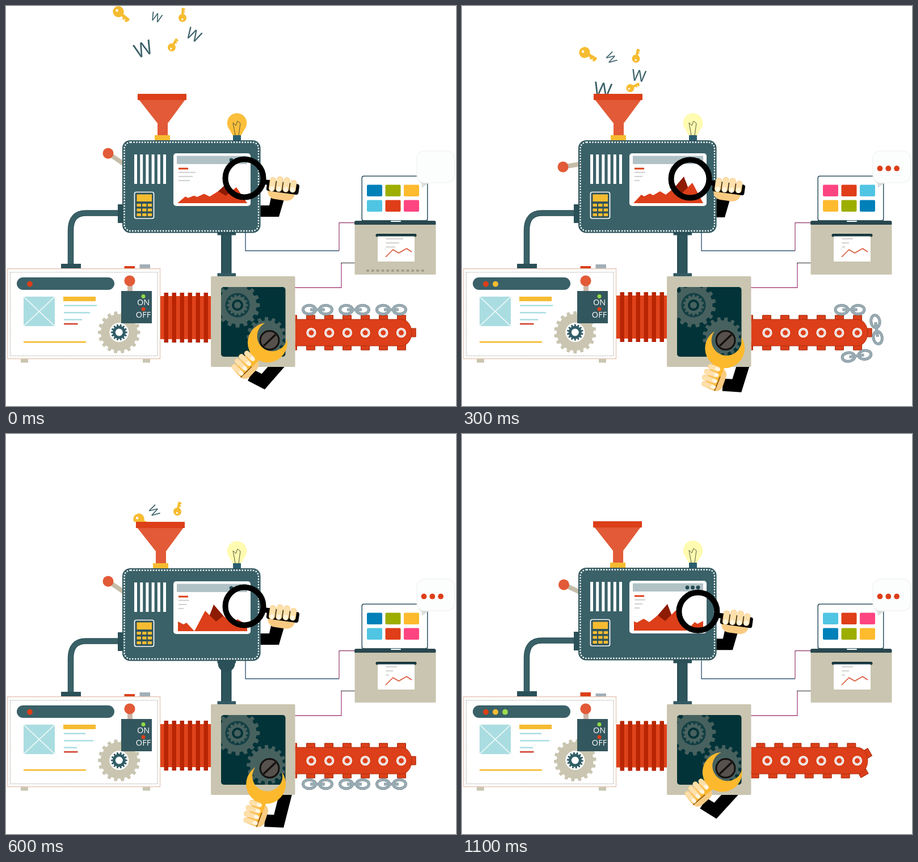
An HTML page with a canvas that plays this animation: 793x706 px, repeating every 1.2 s.

```html
<!DOCTYPE html>
<html lang="en">
<head>
<meta charset="utf-8">
<title>Content machine</title>
<style>
html, body { margin: 0; width: 100%; height: 100%; overflow: hidden; background: #fff; }
canvas { display: block; width: 793px; height: 706px; }
</style>
</head>
<body>
<canvas id="stage" width="793" height="706"></canvas>
<script>
const c = document.getElementById('stage').getContext('2d');
const TEAL = '#3a6168', DEEP = '#2b5058', NIGHT = '#023338', BEIGE = '#c9c5b0',
  RED = '#dc3f19', CORAL = '#e25a37', GOLD = '#f6bc31', SKY = '#aadde1',
  AMBER = '#fdb92d', SKIN = '#f9cb82', FINGER = '#fde0ab', NAIL = '#fff6e0', PI = Math.PI;

// Angles are in degrees; time s runs from 0 to 12 in steps of 100 ms.
const sin = deg => Math.sin(deg * PI / 180);
const cos = deg => Math.cos(deg * PI / 180);
const clamp = (v, lo, hi) => Math.min(hi, Math.max(lo, v));

function rect(x1, y1, x2, y2, fill, r = 0) {
  c.beginPath();
  c.roundRect(x1, y1, x2 - x1, y2 - y1, r);
  c.fillStyle = fill;
  c.fill();
}
function frame(x1, y1, x2, y2, color, w, r = 0) {
  c.beginPath();
  c.roundRect(x1, y1, x2 - x1, y2 - y1, r);
  stroke(color, w);
}
function stroke(color, w) {
  c.strokeStyle = color;
  c.lineWidth = w;
  c.stroke();
}
function disc(x, y, r, fill) {
  c.beginPath();
  c.arc(x, y, r, 0, 2 * PI);
  c.fillStyle = fill;
  c.fill();
}
function ring(x, y, r, color, w) {
  c.beginPath();
  c.arc(x, y, r, 0, 2 * PI);
  stroke(color, w);
}
function trace(pts) {
  c.beginPath();
  pts.forEach(([x, y]) => c.lineTo(x, y));
}
function poly(pts, fill) {
  trace(pts);
  c.closePath();
  c.fillStyle = fill;
  c.fill();
}
function line(pts, color, w) {
  trace(pts);
  stroke(color, w);
}
function group(x, y, deg, draw) {
  c.save();
  c.translate(x, y);
  c.rotate(deg * PI / 180);
  draw();
  c.restore();
}
function clipped(x1, y1, x2, y2, draw) {
  c.save();
  c.beginPath();
  c.rect(x1, y1, x2 - x1, y2 - y1);
  c.clip();
  draw();
  c.restore();
}
function gear(x, y, r, n, depth, fill, turn = 0) {
  const pts = [];
  for (let i = 0; i < n; i++) {
    [-.3, -.2, .2, .3].forEach((o, k) => {
      const a = (i + o + turn) / n * 360, d = k % 3 ? r : r - depth;
      pts.push([x + d * cos(a), y + d * sin(a)]);
    });
  }
  poly(pts, fill);
}
function text(str, x, y, size, fill) {
  c.font = size + 'px "Open Sans", "Noto Sans", sans-serif';
  c.textAlign = 'center';
  c.textBaseline = 'alphabetic';
  c.fillStyle = fill;
  c.fillText(str, x, y);
}

function doorKey(k) {
  c.scale(k, k);
  rect(5, -2.5, 22, 2.5, GOLD, 1);
  rect(12, 0, 15, 5, GOLD);
  rect(17, 0, 21, 5, GOLD);
  disc(0, 0, 8.8, GOLD);
  disc(-3, 0, 2, '#fff');
}
function letter(size) {
  text('W', 0, size * .357, size, TEAL);
}

// Pieces drop quickly, then sink slowly into the funnel.
function falling(s) {
  const drop = (draw, size, x, y, deg, drift, spin, late = 10) =>
    group(x + drift * s, y + 24 * Math.min(s, 4) + late * Math.max(0, s - 4),
      deg + spin * Math.min(s, 2), () => draw(size));
  clipped(150, 0, 400, 155, () => {
    drop(doorKey, 1.1, 198, 10, 40, 6, -5, 22);
    drop(doorKey, .8, 311, 21, -88, -1.5, 5);
    drop(doorKey, .8, 292, 73, -60, 1.5, 16, 24);
    drop(letter, 21, 265, 20, 20, -.7, 20);
    drop(letter, 28, 331, 51, 28, -6.5, -10, 24);
    drop(letter, 35, 242, 76, -20, 2, 14, 24);
  });
}

function wires() {
  line([[422, 400], [422, 432], [587, 432]], '#34587a', 1.4);
  line([[587, 432], [587, 382.5], [615, 382.5]], '#9a4a78', 1.3);
  line([[509, 497], [591, 497], [591, 453.5]], '#a8447c', 1.3);
  line([[590, 453.5], [615, 453.5]], '#555', 1.3);
}

// One mountain range, repeated side by side; it faces left or right.
function chart(s) {
  const flip = s < 4 || s > 7;
  const peak = flip ? (s < 4 ? 391 : 362) : (s < 6 ? 339 : 366);
  const tall = Math.min(1, .78 + s * .11);
  const ridge = [[-34, 0], [-15, 36], [4, 17], [17, 27], [32, 15], [42, 21], [54, 14], [60, 17], [70, 12], [75, 15], [89, 0]];
  clipped(303, 285, 425, 348, () => {
    for (const shift of [-123, 0, 123]) {
      const map = ([x, h]) => [peak + shift + (flip ? -x : x), 348 - h * tall];
      poly([[-14, 10], [0, 47], [30, 12]].map(map), '#8e1b04');
      poly(ridge.map(map), RED);
    }
  });
}

function bulb(lit) {
  const glass = lit ? '#fffbb0' : '#fbbf3c';
  disc(407, 206.5, 17.3, glass);
  poly([[391, 213], [423, 213], [414, 229], [400, 229]], glass);
  line([[404, 228], [400, 206], [405, 211], [408, 203], [413, 207], [410, 228]], '#54593a', 1);
  rect(400, 228, 414, 238, '#2b5f70', 1);
}

function funnel() {
  poly([[234, 165], [316, 165], [285, 207], [285, 229], [267, 229], [267, 207]], CORAL);
  rect(232, 155, 318, 166, RED);
  rect(262, 228, 289, 238, GOLD);
}

function lever(s) {
  const x = 179 + cos(60 * s), y = 272 - 12 * cos(60 * s);
  line([[x, y], [208, 279]], '#c5bda9', 8);
  disc(x, y, 9.5, CORAL);
}

function machine(s, lit) {
  lever(s);
  c.save();
  c.translate(0, s < 7 ? 0 : -1);
  c.beginPath();
  c.moveTo(198, 365.5);
  c.lineTo(141, 365.5);
  c.quadraticCurveTo(114, 365.5, 114, 396);
  c.lineTo(114, 456);
  stroke(DEEP, 10.5);
  stroke(TEAL, 8);
  rect(97, 455, 132, 464, DEEP);
  rect(197, 350, 206, 383, DEEP);
  group(-4.8 * Math.max(0, sin((s - 4.5) * 26)), 0, 0, funnel);
  bulb(lit);
  rect(205, 237, 448.5, 400.5, DEEP, 14);
  rect(206, 238, 447.5, 399, TEAL, 13);
  c.setLineDash([2.4, 2.5]);
  frame(208.5, 240.5, 445, 397, '#fff', 2.3, 11);
  c.setLineDash([]);
  for (let i = 0; i < 6; i++) rect(226 + i * 10.2, 262, 231 + i * 10.2, 314, '#fff');
  rect(226, 328, 261, 375, '#31545b', 3);
  frame(226.5, 328.5, 260.5, 375, '#fff', 1.7, 3);
  rect(230.5, 332.5, 257, 345, GOLD);
  for (let i = 0; i < 9; i++) {
    const x = 230.5 + i % 3 * 9.6, y = 349 + Math.floor(i / 3) * 8.5;
    rect(x, y, x + 7.5, y + 5, GOLD, 1);
  }
  rect(295, 260, 431, 353, '#fff', 5);
  rect(301, 264.5, 425, 279, '#b1c2c6');
  for (let i = 0; i < 3; i++) disc(397 + i * 9.5, 272, 3.4, '#234b52');
  rect(304, 285.5, 321, 288.5, RED);
  for (let i = 0; i < 3; i++) rect(304, 292.7 + i * 7.2, (lit ? 323 : 334) - i * 5, 294.7 + i * 7.2, '#ccd0ce');
  chart(s);
  c.restore();
}

function fingers(n, step, length) {
  for (let i = 0; i < n; i++) {
    const x = i * step, tip = i % 3 ? -3 : 0, end = length - i;
    rect(x, tip, x + step - 1.2, end, SKIN, 5);
    rect(x + .8, tip + .8, x + step - 2.2, end - 1, FINGER, 4.5);
    rect(x + 2, end - 9, x + step - 3.2, end, NAIL, 3);
  }
}

// The glass circles twice per loop.
function magnifier(s) {
  const turn = -3 - 60 * s, x = 411 + 9 * cos(turn), y = 304.5 + 10.5 * sin(turn);
  clipped(448.5, 180, 600, 480, () => group(x, y, 0, () =>
    poly([[48, 30], [73, 27], [61, 68], [10, 68], [10, 48], [44, 48]], '#000')));
  group(x, y, 0, () => {
    ring(0, 0, 33.5, '#000', 10);
    group(42, 3, 8, () => {
      rect(2, 3, 50, 32, SKIN, 14);
      rect(-6, 0, 7, 9, '#000');
      rect(-1, 0, 56, 19, '#000', 4);
      group(3, -6, 0, () => fingers(4, 12.2, 25));
    });
  });
}

function drop(s) {
  rect(379, 400, 397.5, 474, DEEP);
  rect(382, 404, 395, 472, '#2e555c');
  if (s > 5 && s < 10) clipped(370, 400, 407, 474, () => disc(388.5, 405 + (s - 6) * 24, 15, DEEP));
  rect(372.5, 399, 405, 404.5, DEEP);
  rect(372.5, 471.5, 405, 478, '#345b63');
}

function page(s, stage) {
  rect(208.5, s < 7 ? 459 : 456, 227, 465, RED);
  rect(235.5, s < 7 ? 456 : 458, 254, 465, '#a2afb8');
  rect(26, 622, 39, 629.5, BEIGE);
  rect(241, 622, 254, 629.5, BEIGE);
  rect(2, 463, 272, 623, '#fff');
  frame(2.7, 463.7, 271.5, 622.5, '#e6c8b8', 1.4);
  c.setLineDash([1.3, 1.7]);
  frame(7.5, 470, 267, 617.5, '#8b8b80', 1.2);
  c.setLineDash([]);
  rect(19, 479, 191, 501, TEAL, 11);
  [RED, '#f8bd32', '#9ddb4c'].slice(0, stage + 1).forEach((col, i) => disc(42 + i * 17, 490.7, 4.9, col));
  rect(31, 513, 86, 565, SKY);
  line([[31, 513], [86, 565]], '#fff', 1.3);
  line([[86, 513], [31, 565]], '#fff', 1.3);
  rect(101, 513, 158, 521, GOLD);
  const wide = s < 2 || stage === 1;
  [wide ? 160 : 140, wide ? 148 : 154, wide ? 134 : 125].forEach((x, i) =>
    rect(102, 527.5 + i * 12.4, x, 530 + i * 12.4, SKY));
  rect(102, 559.7, 126.5, 562.5, '#d14a38');
  rect(31, 591.7, 141, 594.5, GOLD);
  gear(199.3, 576, 37.3, 18, 5, BEIGE, s / 6);
  disc(199.3, 576, 17, '#fff');
  gear(199.3, 576, 14.5, 14, 3, '#315d66', -s / 6);
  disc(199.3, 576, 6.5, '#fff');
  rect(214, 490, 223, 505, '#ccb6a8');
  disc(218, 485, 9.6, CORAL);
  rect(203, 503, 257, 560, '#33575e');
  disc(242, 512.5, 3.5, '#8fdc45');
  disc(242, 535, 3.5, RED);
  text('ON', 242, 528, 14.5, '#fff');
  text('OFF', 242, 550.3, 14.5, '#fff');
}

function bellows(s) {
  group(0, 1 - sin(30 * s), 0, () => {
    rect(272, 511, 361, 587, '#e0431b');
    for (let i = 0; i < 6; i++) rect(278.5 + i * 14, 505, 286 + i * 14, 593, '#b82503');
  });
}

function cabinet(s) {
  rect(361, 477, 509.5, 637, BEIGE, 2);
  rect(379, 496, 492.5, 619, NIGHT, 5);
  clipped(379, 496, 492, 619, () => {
    gear(408, 528, 39.5, 16, 6, '#47615f', s / 6);
    disc(408, 528, 21.5, '#123f43');
    gear(408, 528, 18.5, 14, 3, '#48625f', -s / 6);
    disc(408, 528, 10, NIGHT);
    disc(408, 528, 6, '#47615f');
    gear(459, 584, 35, 16, 6, '#47615f', -s / 6);
  });
  disc(464.5, 590, 18, '#14110f');
  disc(464.5, 590, 15, '#57514d');
  line([[454, 600], [475, 580]], '#14110f', 3.5);
}

// Open jaw: a disc with a smaller circle bitten out of its top.
function jaw(r, bite, rise) {
  const y = (r * r - bite * bite + rise * rise) / (2 * rise), x = Math.sqrt(r * r - y * y);
  const outer = Math.atan2(y, x), inner = Math.atan2(y - rise, x);
  c.beginPath();
  c.arc(0, 0, r, -outer, PI + outer);
  c.arc(0, -rise, bite, PI + inner, -inner, true);
  c.closePath();
  c.fillStyle = AMBER;
  c.fill();
}

function arm(x, y, tilt) {
  const wx = x + 18 * cos(tilt) - 62 * sin(tilt), wy = y + 18 * sin(tilt) + 62 * cos(tilt);
  const ex = wx + 25 * cos(tilt - 16), ey = wy + 25 * sin(tilt - 16);
  const sx = 474 + (ex - 450) * .6;
  clipped(380, 637, 540, 706, () =>
    line([[wx, wy], [ex, ey], [sx + (sx - ex) * .6, 637 + (637 - ey) * .6]], '#000', 22));
}

function wrench(s) {
  const x = 459.5 + 4 * sin(30 * s + 20), y = 606 - 12 * cos(30 * s - 9);
  const tilt = 31 + 17 * cos(30 * s + 42);
  arm(x, y, tilt);
  group(x, y, tilt, () => {
    rect(-13, 35, 19, 77, SKIN, 12);
    poly([[-11, 25], [11, 25], [9, 76], [-9, 76]], AMBER);
    line([[9, 50], [8, 77]], '#7b4a12', 1.5);
    group(0, 0, -8, () => jaw(35, 26.5, 14));
    group(-18, 76, -90, () => fingers(4, 10.8, 26));
  });
}

function conveyor(s) {
  const edge = '#a52c0e';
  clipped(509.5, 500, 793, 660, () => {
    for (let p = 505 + s % 3 * 32 / 3; p < 960; p += 32) {
      const a = clamp((p - 697) / 64, 0, 1) * 180;
      const x = p < 697 ? p : p > 761 ? 1458 - p : 697 + 18 * sin(a);
      group(x, 576.5 - 23.5 * cos(a), a, () => {
        rect(-7.5, -7.5, 7.5, 5, RED);
        frame(-7.5, -7, 7.5, 5, edge, 1);
      });
    }
    c.beginPath();
    c.moveTo(500, 553);
    c.lineTo(697, 553);
    c.ellipse(697, 576.5, 18, 23.5, 0, -PI / 2, PI / 2);
    c.lineTo(500, 600);
    c.fillStyle = RED;
    c.fill();
    stroke(edge, .8);
  });
  for (let i = 0; i < 6; i++) {
    const x = 538 + i * 31.7;
    disc(x, 576.7, 8.6, '#fff');
    ring(x, 576.7, 6.3, '#b9938a', .8);
    disc(x, 576.7, 4.6, RED);
  }
}

function link() {
  for (const [color, w] of [['#7b8f97', 5], ['#9aacb3', 3.4]]) {
    for (const x of [-14.5, 14.5]) {
      c.beginPath();
      c.ellipse(x, 0, 11, 7.7, 0, 0, 2 * PI);
      stroke(color, w);
    }
    line([[-13, 0], [13, 0]], color, w);
  }
}

// Links creep along the top, whip round the end and run back below.
function links(s) {
  const head = 549 + 21 * s + 71.5 * clamp(s - 2, 0, 2) + 6 * Math.max(0, s - 4) + 30 * Math.max(0, s - 7);
  clipped(509.5, 500, 793, 660, () => {
    for (let i = 0; i < 3; i++) {
      const p = head + i * 65, a = clamp((p - 690) / 129, 0, 1) * 180;
      const x = p < 690 ? p : p > 819 ? 1509 - p : 690 + 41 * sin(a);
      group(x, 577 - 41 * cos(a), a, link);
    }
  });
}

function laptop(stage, lit) {
  rect(626.5, 299.5, 743.5, 380, '#2d5360', 4);
  rect(628, 301, 742, 378, '#fff', 3);
  const base = ['#0080b8', '#9dae00', '#ffbb2e', '#50c5e3', '#df3e19', '#ff4581'];
  const tiles = [base, [...base].reverse(), [...base.slice(3), ...base.slice(0, 3)]][stage];
  tiles.forEach((col, i) => {
    const x = 636 + i % 3 * 32.5, y = i < 3 ? 315.5 : 342.5;
    rect(x, y, x + 27, y + 20.5, col, 2);
  });
  rect(614, 379, 757.5, 387, '#29474e', 3);
  rect(678, 379, 696, 381, '#fff', 1);
  rect(614.5, 386, 757.5, 474, BEIGE, 1);
  rect(651.5, 402, 723.5, 407.5, '#16383e', 2.7);
  rect(655, 404.5, 720, 451, '#fff', 1);
  rect(655, 403.5, 720, 406.5, '#16383e');
  for (let i = 0; i < 3; i++) rect(669.5, 410 + i * 7.2, (lit ? 689 : 700) - i * 7, 412 + i * 7.2, '#d0d1cb');
  line([[669, 443], [682, 430], [692, 436], [706, 428], [715, 434]], '#d9583a', 1.6);
  if (!lit) for (let i = 0; i < 12; i++) rect(635 + i * 8.8, 465, 640 + i * 8.8, 469, '#a39f8b');
  poly([[726, 308], [752, 310], [744, 313], [733, 321], [732, 313]], '#d9dfde');
  rect(724, 256, 791, 312, '#fcfefd', 13);
  frame(724, 256, 790.7, 312, '#eceeec', 1, 13);
  if (lit) for (let i = 0; i < 3; i++) disc(736.5 + i * 14.8, 286.7, 4.9, RED);
}

function draw(now) {
  const s = Math.floor(now % 1200 / 100), beat = Math.floor(s / 2);
  const stage = beat % 3, lit = beat % 2 === 1;
  c.fillStyle = '#fff';
  c.fillRect(0, 0, 793, 706);
  wires();
  falling(s);
  drop(s);
  machine(s, lit);
  magnifier(s);
  page(s, stage);
  bellows(s);
  conveyor(s);
  links(s);
  cabinet(s);
  wrench(s);
  laptop(stage, lit);
}

function tick() {
  draw(performance.now());
  requestAnimationFrame(tick);
}
tick();
</script>
</body>
</html>
```
